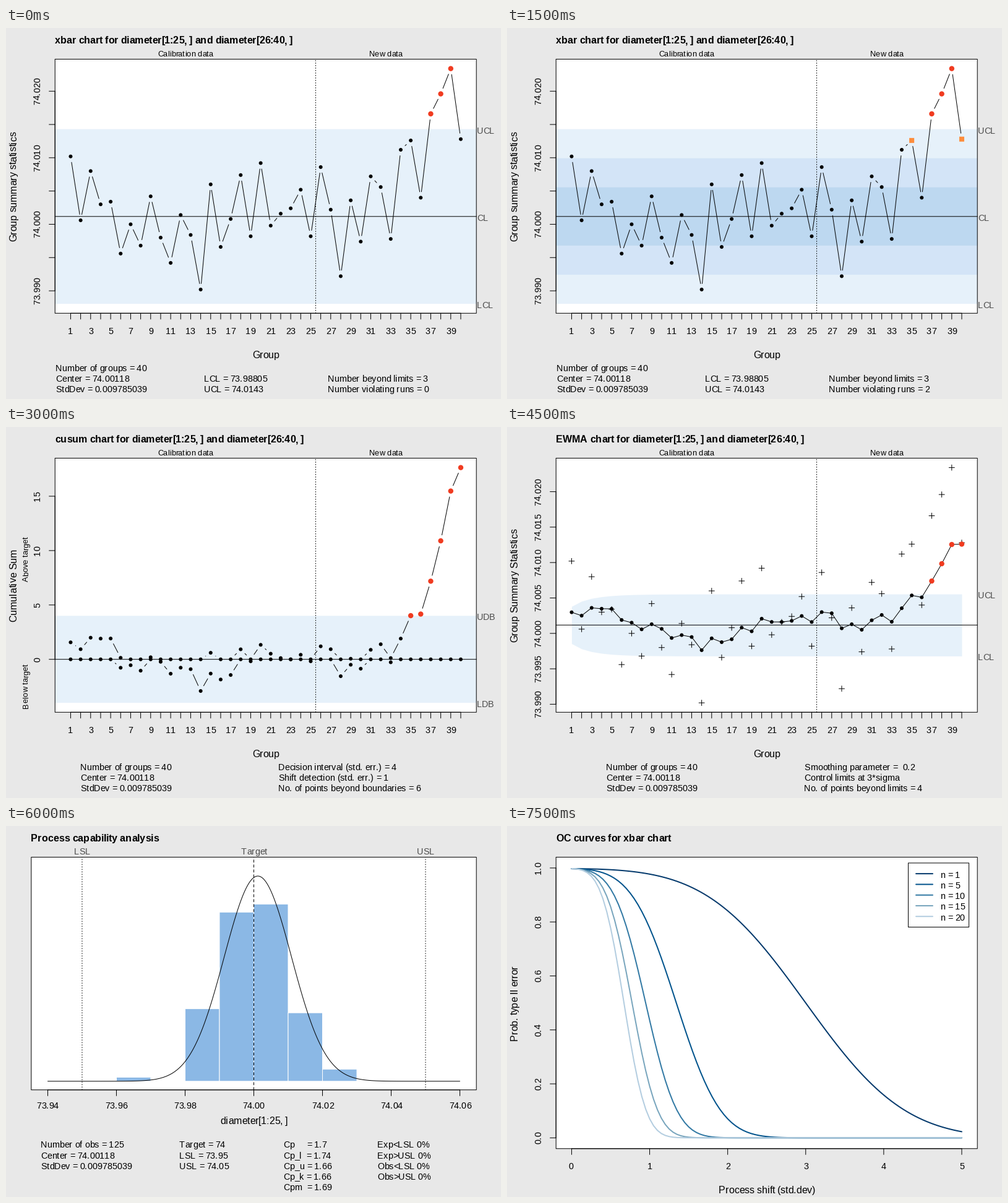
Animation of 800 by 600 pixels, one loop 8000 ms. Source, as a matplotlib script:

```python
import math

import numpy as np
import matplotlib as mpl
import matplotlib.pyplot as plt
from matplotlib.animation import FuncAnimation
from matplotlib.collections import LineCollection
from matplotlib.patches import Circle, Rectangle
from matplotlib.textpath import text_to_path

mpl.rcParams.update({
    "font.family": "Liberation Sans",
    "text.hinting": "force_autohint",
    "text.hinting_factor": 8,
    "path.snap": False,
    "path.simplify": False,
})

PX = 0.72                      # points per pixel at 100 dpi
LINE = 19.2                    # height of one margin line
LEFT, RIGHT, TOP, BOTTOM = 79.22, 760.18, 50.42, 461.3
BIG, MID, SMALL = 16, 14.4, 12.8
MARGIN, GREY = "#e8e8e8", "#4d4d4d"
ZONES = ["#e6f1fa", "#d3e4f7", "#bdd8f0"]
RED, ORANGE, BAR = "#f03b20", "#fd8d3c", "#8bb8e5"

# Group means, in 0.0001 above 74
MEANS = np.array([
    102, 6, 80, 30, 34, -44, 0, -32, 42, -20, -58, 14, -16, -98, 60, -34, 8, 74, -18, 92,
    -2, 16, 24, 52, -18, 86, 22, -78, 36, -26, 72, 56, -22, 112, 126, 40, 166, 196, 234, 128,
]) / 1e4
GROUPS = np.arange(1, 41)
CENTER = MEANS[:25].mean()
SD = 0.009785039
SE = SD / math.sqrt(5)

fig = plt.figure(figsize=(8, 6), dpi=100, facecolor=MARGIN)


def scale(lo, hi, start, end):
    """Map lo..hi to pixels, leaving 4 % free at both ends."""
    pad = (end - start) * 0.04 / 1.08
    a, b = start + pad, end - pad
    return lambda v: a + (np.asarray(v, float) - lo) * (b - a) / (hi - lo)


def new_scene():
    ax = fig.add_axes([0, 0, 1, 1])
    ax.set_xlim(0, 800)
    ax.set_ylim(600, 0)
    ax.axis("off")
    ax.set_visible(False)
    return ax


def text(ax, x, y, s, size=MID, center=False, color="black", up=False, weight="normal"):
    """Set a string with every glyph advance rounded to whole pixels."""
    glyphs = [ax.text(0, 0, ch, fontsize=size * PX, color=color, weight=weight,
                      ha="left", va="baseline", rotation=90 if up else 0,
                      rotation_mode="anchor") for ch in s]
    steps = [math.floor(text_to_path.get_text_width_height_descent(
        g.get_text(), g.get_fontproperties(), False)[0] / PX + 0.5) for g in glyphs]
    back = sum(steps) / 2 if center else 0
    pen = round(float(y + back)) if up else round(float(x - back))
    for g, step in zip(glyphs, steps):
        g.set_position((x, pen) if up else (pen, y))
        pen += -step if up else step


def line(ax, x, y, color="black", width=1, zorder=2, dash=None):
    style = {"linestyle": (0, dash), "dash_capstyle": "round"} if dash else {}
    ax.plot(x, y, color=color, lw=width * PX, zorder=zorder,
            solid_capstyle="round", solid_joinstyle="round", **style)


def segments(ax, segs, zorder=2):
    ax.add_collection(LineCollection(segs, colors="black", linewidths=PX,
                                     capstyle="round", zorder=zorder), autolim=False)


def rect(ax, x0, y0, x1, y1, fill, edge="none", zorder=1):
    ax.add_patch(Rectangle((x0, y0), x1 - x0, y1 - y0, facecolor=fill, edgecolor=edge,
                           lw=0 if edge == "none" else PX, joinstyle="round", zorder=zorder))


def dots(ax, xs, ys, r=3.0, color="black", zorder=3):
    for x, y in zip(xs, ys):
        ax.add_patch(Circle((x, y), r, facecolor=color, lw=0, zorder=zorder))


def broken_line(ax, xs, ys, gap=9.6):
    """Join points, leaving a gap around each one."""
    pts = np.column_stack([xs, ys])
    segs = []
    for p, q in zip(pts[:-1], pts[1:]):
        d = np.hypot(*(q - p))
        if d > 2 * gap:
            cut = (q - p) * gap / d
            segs.append([p + cut, q - cut])
    segments(ax, segs)


def frame(ax, title, left=LEFT, bottom=BOTTOM):
    rect(ax, left, TOP, RIGHT, bottom, "white", zorder=0)
    rect(ax, left, TOP, RIGHT, bottom, "none", "black", zorder=5)
    text(ax, math.floor(left), 25, title, BIG, weight="bold")


def x_axis(ax, ticks, labels, base, label_y):
    segments(ax, [[(x, base), (x, base + LINE / 2)] for x in ticks])
    line(ax, [ticks[0], ticks[-1]], [base, base], zorder=5)
    for x, s in zip(ticks, labels):
        text(ax, x, label_y, s, center=True)


def y_axis(ax, ticks, labels):
    segments(ax, [[(LEFT - LINE / 2, y), (LEFT, y)] for y in ticks])
    line(ax, [LEFT, LEFT], [ticks[0], ticks[-1]], zorder=5)
    for y, s in zip(ticks, labels):
        text(ax, 55, y, s, center=True, up=True)


def columns(ax, cols, rows):
    for x, lines in cols.items():
        for y, s in zip(rows, lines):
            text(ax, x, y, s)


gx = scale(1, 40, LEFT, RIGHT)
GX = gx(GROUPS)


def control_chart(kind, ylabel, stats):
    ax = new_scene()
    frame(ax, kind + " chart for diameter[1:25, ] and diameter[26:40, ]")
    x_axis(ax, GX, [str(g) if g % 2 else "" for g in GROUPS], BOTTOM, 495)
    text(ax, (LEFT + RIGHT) / 2, 534, "Group", BIG, center=True)
    text(ax, 17, (TOP + BOTTOM) / 2, ylabel, BIG, center=True, up=True)
    text(ax, gx(12.5), 46, "Calibration data", SMALL, center=True)
    text(ax, gx(32.5), 46, "New data", SMALL, center=True)
    line(ax, [gx(25.5)] * 2, [BOTTOM, TOP], dash=(1, 3))
    columns(ax, stats, (555, 572, 589))
    return ax


def side_label(ax, y, s):
    text(ax, 761, round(float(y) + 7), s, color=GREY)


SUMMARY = ["Number of groups = 40", "Center = 74.00118", "StdDev = 0.009785039"]


def xbar_scene(zones):
    ax = control_chart("xbar", "Group summary statistics", {
        80: SUMMARY,
        320: ["", "LCL = 73.98805", "UCL = 74.0143"],
        520: ["", "Number beyond limits = 3",
              "Number violating runs = %d" % (2 if zones else 0)],
    })
    sy = scale(CENTER - 3 * SE, MEANS.max(), BOTTOM, TOP)
    for k, color in zip((3, 2, 1) if zones else (3,), ZONES):
        rect(ax, LEFT, sy(CENTER + k * SE), RIGHT, sy(CENTER - k * SE), color)
    ticks = np.arange(-10, 21, 5) / 1e3
    y_axis(ax, sy(ticks), ["%.3f" % (74 + t) if i % 2 == 0 else "" for i, t in enumerate(ticks)])
    line(ax, [LEFT, RIGHT], [sy(CENTER)] * 2)
    for k, s in ((3, "UCL"), (0, "CL"), (-3, "LCL")):
        side_label(ax, sy(CENTER + k * SE), s)

    ys = sy(MEANS)
    broken_line(ax, GX, ys)
    beyond = MEANS > CENTER + 3 * SE
    runs = np.isin(GROUPS, (35, 40)) & zones
    plain = ~(beyond | runs)
    dots(ax, GX[plain], ys[plain])
    dots(ax, GX[beyond], ys[beyond], 4.2, RED)
    for x, y in zip(GX[runs], ys[runs]):
        rect(ax, x - 4, y - 4, x + 4, y + 4, ORANGE, zorder=3)
    return ax


def cusum_scene():
    ax = control_chart("cusum", "Cumulative Sum", {
        120: SUMMARY,
        440: ["Decision interval (std. err.) = 4", "Shift detection (std. err.) = 1",
              "No. of points beyond boundaries = 6"],
    })
    up, down, ups, downs = 0, 0, [], []
    for z in (MEANS - CENTER) / SE:
        up, down = max(0, up + z - 0.5), min(0, down + z + 0.5)
        ups.append(up)
        downs.append(down)
    ups, downs = np.array(ups), np.array(downs)

    sy = scale(-4, ups.max(), BOTTOM, TOP)
    rect(ax, LEFT, sy(4), RIGHT, sy(-4), ZONES[0])
    y_axis(ax, sy([0, 5, 10, 15]), ["0", "5", "10", "15"])
    zero = float(sy(0))
    line(ax, [LEFT, RIGHT], [zero, zero])
    text(ax, 36, (zero + TOP) / 2, "Above target", SMALL, center=True, up=True)
    text(ax, 36, (zero + BOTTOM) / 2, "Below target", SMALL, center=True, up=True)
    side_label(ax, sy(4), "UDB")
    side_label(ax, sy(-4), "LDB")
    for vals in (ups, downs):
        broken_line(ax, GX, sy(vals))
        out = np.abs(vals) > 4
        dots(ax, GX[~out], sy(vals[~out]))
        dots(ax, GX[out], sy(vals[out]), 4.2, RED)
    return ax


def ewma_scene():
    ax = control_chart("EWMA", "Group Summary Statistics", {
        160: SUMMARY,
        480: ["Smoothing parameter =  0.2", "Control limits at 3*sigma",
              "No. of points beyond limits = 4"],
    })
    lam, s, smooth = 0.2, CENTER, []
    for m in MEANS:
        s += lam * (m - s)
        smooth.append(s)
    smooth = np.array(smooth)
    half = 3 * SE * np.sqrt(lam / (2 - lam) * (1 - (1 - lam) ** (2 * GROUPS)))

    sy = scale(MEANS.min(), MEANS.max(), BOTTOM, TOP)
    ax.fill_between(GX, sy(CENTER + half), sy(CENTER - half), color=ZONES[0], lw=0, zorder=1)
    ticks = np.arange(-10, 21, 5) / 1e3
    y_axis(ax, sy(ticks), ["%.3f" % (74 + t) for t in ticks])
    line(ax, [LEFT, RIGHT], [sy(CENTER)] * 2)
    side_label(ax, sy(CENTER + half[-1]), "UCL")
    side_label(ax, sy(CENTER - half[-1]), "LCL")

    arm = 4.5
    for x, y in zip(GX, sy(MEANS)):
        segments(ax, [[(x - arm, y), (x + arm, y)], [(x, y - arm), (x, y + arm)]])
    ys = sy(smooth)
    line(ax, GX, ys)
    out = np.abs(smooth - CENTER) > half
    dots(ax, GX[~out], ys[~out])
    dots(ax, GX[out], ys[out], 4.2, RED)
    return ax


def capability_scene():
    ax = new_scene()
    left, bottom = 40.82, 426.74
    frame(ax, "Process capability analysis", left, bottom)
    sx = scale(-0.06, 0.06, left, RIGHT)
    peak = 1 / (SD * math.sqrt(2 * math.pi))
    sy = scale(0, peak * 1.05, bottom, TOP)

    for i, n in enumerate((1, 0, 18, 42, 44, 17, 3)):
        lo = -0.04 + i * 0.01
        rect(ax, sx(lo), sy(n * 0.8), sx(lo + 0.01), sy(0), BAR, "white")
    t = np.linspace(-0.06, 0.06, 500)
    line(ax, sx(t), sy(peak * np.exp(-((t - CENTER) / SD) ** 2 / 2)))

    for v, s, dash in ((-0.05, "LSL", (1, 3)), (0, "Target", (4, 4)), (0.05, "USL", (1, 3))):
        line(ax, [sx(v)] * 2, [bottom, TOP], dash=dash)
        text(ax, sx(v), 46, s, center=True, color=GREY)
    ticks = np.arange(-3, 4) * 0.02
    x_axis(ax, sx(ticks), ["%.2f" % (74 + v) for v in ticks], bottom, 457)
    text(ax, (left + RIGHT) / 2, 482, "diameter[1:25, ]", BIG, center=True)
    columns(ax, {
        56: ["Number of obs = 125"] + SUMMARY[1:],
        280: ["Target = 74", "LSL = 73.95", "USL = 74.05"],
        448: ["Cp     = 1.7", "Cp_l  = 1.74", "Cp_u = 1.66", "Cp_k = 1.66", "Cpm  = 1.69"],
        600: ["Exp<LSL 0%", "Exp>USL 0%", "Obs<LSL 0%", "Obs>USL 0%"],
    }, (520, 538, 555, 572, 589))
    return ax


def oc_scene():
    ax = new_scene()
    bottom = 521.78
    frame(ax, "OC curves for xbar chart", bottom=bottom)
    sx, sy = scale(0, 5, LEFT, RIGHT), scale(0, 1, bottom, TOP)
    x_axis(ax, sx(range(6)), [str(i) for i in range(6)], bottom, 555)
    ticks = np.arange(6) / 5
    y_axis(ax, sy(ticks), ["%.1f" % v for v in ticks])
    text(ax, (LEFT + RIGHT) / 2, 594, "Process shift (std.dev)", BIG, center=True)
    text(ax, 17, (TOP + bottom) / 2, "Prob. type II error", BIG, center=True, up=True)

    def phi(z):
        return 0.5 * (1 + math.erf(z / math.sqrt(2)))

    top, step = 59.85, 17.28
    rect(ax, 648.5, top, 746.56, top + 6 * step, "white", "black", zorder=3)
    shift = np.linspace(0, 5, 101)
    blues = ("#03396c", "#01538c", "#3279a4", "#78a5bd", "#b3cde0")
    for i, (n, color) in enumerate(zip((1, 5, 10, 15, 20), blues)):
        beta = [phi(3 - c * math.sqrt(n)) - phi(-3 - c * math.sqrt(n)) for c in shift]
        line(ax, sx(shift), sy(beta), color, 2)
        y = top + step * (i + 1)
        line(ax, [661, 688], [y, y], color, 2, zorder=4)
        text(ax, 700, round(y + 6.5), "n = %d" % n)
    return ax


scenes = [xbar_scene(False), xbar_scene(True), cusum_scene(),
          ewma_scene(), capability_scene(), oc_scene()]


def update(i):
    for k, ax in enumerate(scenes):
        ax.set_visible(k == i // 3)
    return scenes


anim = FuncAnimation(fig, update, frames=16, interval=500, init_func=lambda: update(0),
                     repeat=True, repeat_delay=0, blit=False)
plt.show()
```
